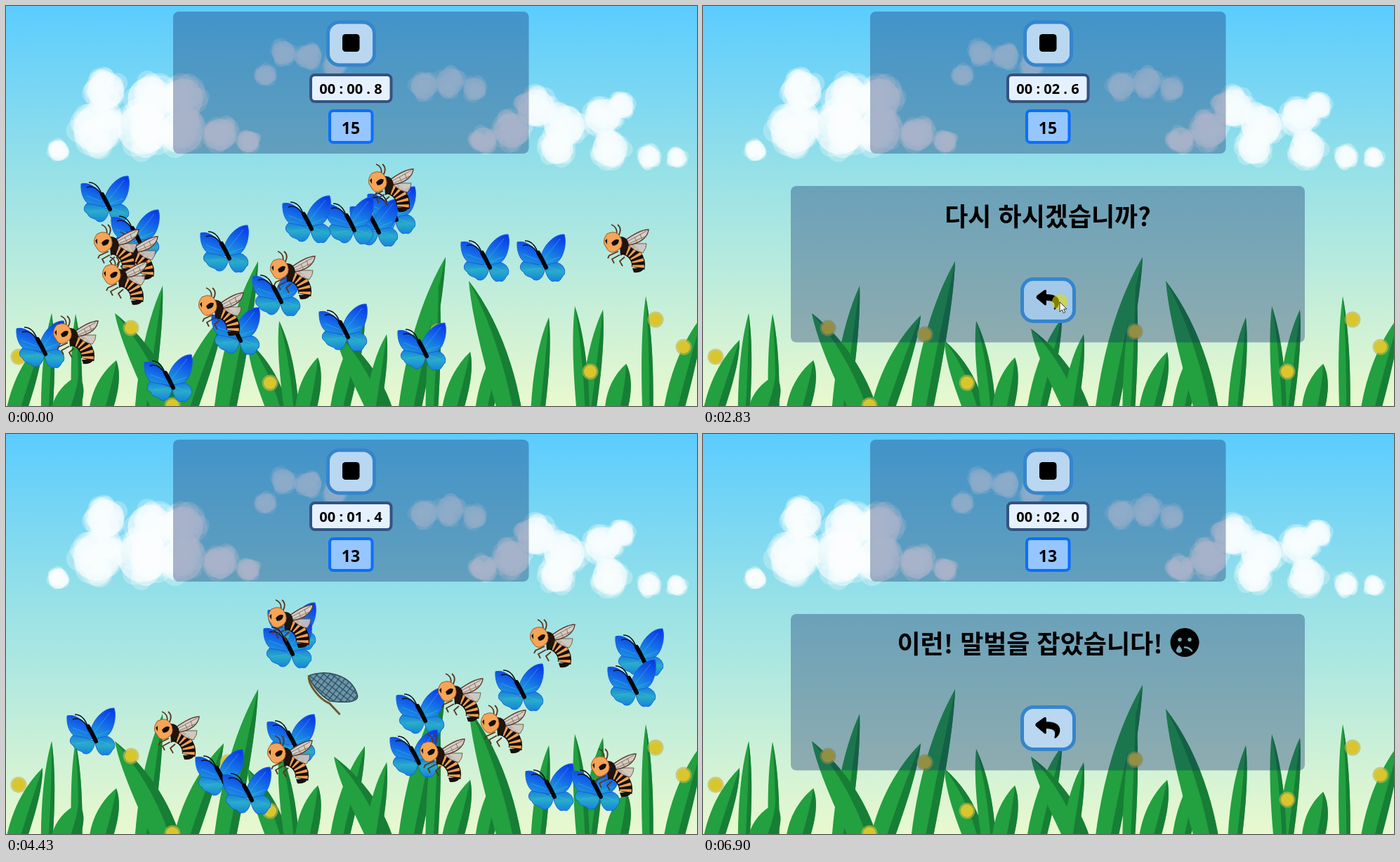
An HTML page for the animation above (6970 ms loop, 984 by 569 pixels).

```html
<!DOCTYPE html>
<html lang="ko">
<head>
<meta charset="utf-8">
<title>Butterfly net</title>
<style>
html, body { margin: 0; width: 100%; height: 100%; overflow: hidden; }
svg { display: block; width: 100vw; height: 100vh; cursor: default; }
text { text-anchor: middle; }
.digits { font-family: "Noto Sans", "Open Sans", sans-serif; font-weight: 600; }
.message { font: 600 36px "Noto Sans CJK KR", "Noto Sans CJK", sans-serif; }
.panel { fill: rgba(15, 42, 105, .35); }
.button { fill: #b9d7f0; stroke: #3585cd; stroke-width: 5; }
.button.hover { fill: #a3c8e8; }
</style>
</head>
<body>
<svg viewBox="0 0 984 569" preserveAspectRatio="none">
  <defs>
    <linearGradient id="sky" x2="0" y2="1">
      <stop offset="0" stop-color="#5bccff"/>
      <stop offset=".4" stop-color="#95e0e8"/>
      <stop offset="1" stop-color="#e9f9ce"/>
    </linearGradient>
    <linearGradient id="wing" x1=".7" y1="0" x2=".3" y2="1">
      <stop offset="0" stop-color="#0a3be6"/>
      <stop offset=".5" stop-color="#146ae8"/>
      <stop offset="1" stop-color="#1f9fd8"/>
    </linearGradient>
    <linearGradient id="lowWing" x2="0" y2="1">
      <stop offset="0" stop-color="#167be0"/>
      <stop offset=".5" stop-color="#28acc8"/>
      <stop offset="1" stop-color="#1583dc"/>
    </linearGradient>
    <pattern id="mesh" width="7" height="7" patternUnits="userSpaceOnUse" patternTransform="rotate(38)">
      <path d="M0 0H7M0 0V7" stroke="#2d4860" stroke-width="2.4"/>
    </pattern>

    <g id="butterfly">
      <g stroke="#1560dc" stroke-width="1" stroke-linejoin="round">
        <path fill="url(#lowWing)" d="M-23 3C-32 8-31 17-25 19C-23 27-14 25-11 30C-4 33 3 29 6 13Z"/>
        <path fill="url(#lowWing)" d="M5 10C6 23 13 36 20 32C28 35 28 27 33 23C36 14 29 6 18 5Z"/>
        <path fill="url(#wing)" d="M-3-5C-11-18-24-26-34-23C-35-10-30 1-24 5L3 10Z"/>
        <path fill="url(#wing)" d="M0-3C4-20 20-35 33-34C37-22 32 0 22 6L7 9Z"/>
      </g>
      <path d="M5 0L27-28M8 5L26-2M-5 2L-26-6M10 12L27 18M-1 14L-20 16" stroke="#48b6f3" opacity=".55"/>
      <path d="M-5-9Q-11-25-23-25M-6-9Q-15-22-26-18" fill="none" stroke="#071326" stroke-width="1.6"/>
      <path d="M-4-8L1 1L7 13" fill="none" stroke="#05070f" stroke-width="6" stroke-linecap="round"/>
    </g>

    <g id="bee">
      <path d="M-11 4L-24 10L-26 14M-9 9L-20 15L-17 21M-2 12L-9 18L-5 25M-14-18Q-11-30-21-34M-11-18Q-5-28-12-34" fill="none" stroke="#593620" stroke-width="1.8"/>
      <path d="M-4-1C9 1 20 15 17 28" fill="none" stroke="#120d0b" stroke-width="19"/>
      <path d="M2 1C12 4 19 16 17 28" fill="none" stroke="#f5a04f" stroke-width="17" stroke-dasharray="3.2 4"/>
      <path d="M9 28H25Q23 35 11 34Z" fill="#17100c"/>
      <path d="M1-7L29-7Q29 0 24 6Q13 5 1-7Z" fill="#cfc6bd" stroke="#6b4c40" opacity=".9"/>
      <path d="M-5-9C7-18 21-27 32-27C31-17 22-8 4-5Z" fill="#d5cec6" stroke="#5d3b30" stroke-width="1.4"/>
      <path d="M0-9L29-25M4-7L27-17M12-16L16-8M20-21L23-12" stroke="#82695d" stroke-width=".9"/>
      <path d="M-10-17Q2-18 4-5Q2 8-8 10Z" fill="#20140f"/>
      <path d="M-27-21Q-13-28-7-14Q-3-2-13 3Q-21 8-26 2L-31-6Q-33-14-27-21Z" fill="#f6a455" stroke="#9b5b28"/>
      <path d="M-21-8Q-15-15-10-12Q-11-4-19-4ZM-30-11L-27-14L-27-6Z" fill="#130d0b"/>
    </g>

    <path id="pointerShape" d="M0 0V14L3.3 11L5.5 15.7L7.7 14.7L5.6 10H10Z" fill="#fff" stroke="#222" stroke-width=".9"/>
    <g id="netShape">
      <path id="bag" d="M-35-25C-12-35 27-28 35 3C36 14 14 13-4 11Q-25-2-35-25Z" fill="rgba(35,75,115,.3)"/>
      <use href="#bag" style="fill: url(#mesh)"/>
      <path d="M-35-25C-12-35 27-28 35 3C36 14 14 13-4 11Q-25-2-35-25Z" fill="url(#mesh)" stroke="#36495a" stroke-width="1.5"/>
      <path d="M-34-26C-37-13-18 9-5 14L10 30" fill="none" stroke="#71572e" stroke-width="3"/>
    </g>
  </defs>

  <rect width="984" height="569" fill="url(#sky)"/>
  <g id="clouds" fill="#fff"></g>
  <g id="grass"></g>

  <rect class="panel" x="238" y="8" width="506.5" height="202" rx="8"/>
  <rect id="stop" class="button" x="458.5" y="23" width="66" height="61" rx="16"/>
  <rect x="479" y="40" width="24.5" height="25" rx="4.5"/>
  <rect x="434" y="98" width="114.5" height="38" rx="6" fill="#e6f1ff" stroke="#335380" stroke-width="4"/>
  <text id="clock" class="digits" x="491" y="124.5" font-size="20"></text>
  <rect x="461" y="149" width="60.5" height="45" rx="5" fill="#96c6ff" stroke="#0d6efd" stroke-width="4"/>
  <text id="score" class="digits" x="491" y="181.5" font-size="23"></text>

  <g id="meadow"></g>

  <g id="dialog">
    <rect class="panel" x="125" y="256" width="732" height="222.5" rx="8"/>
    <text id="retry" class="message" x="491" y="313">다시 하시겠습니까?</text>
    <g id="caughtBee">
      <text class="message" x="465.5" y="312">이런! 말벌을 잡았습니다!</text>
      <g transform="translate(686 296.5)" fill="#79a6b7">
        <circle r="20.5" fill="#000"/>
        <circle cx="-7" cy="-4" r="2.7"/><circle cx="7" cy="-4" r="2.7"/>
        <path d="M-8 4Q-13 10-12 13Q-8 17-4 13Q-3 10-8 4Z"/>
        <path d="M0 7Q6 7 10 12" fill="none" stroke="#79a6b7" stroke-width="2.6" stroke-linecap="round"/>
      </g>
    </g>
    <rect id="back" class="button" x="454.5" y="388.5" width="74" height="60" rx="16"/>
    <path id="arrow" d="M-15.5-6L-5-13.5Q-2-15-2-12V-8C10-8 16-4 16 3C16 8 13 12 10 13.5Q8 14 9 11C11 4 7 1-2 1V6Q-2 9-5 7L-15.5-2Q-17-4-15.5-6Z"/>
  </g>

  <circle id="click" r="11" fill="#e6dc00" opacity=".58"/>
  <use id="pointer" href="#pointerShape"/>
  <use id="net" href="#netShape"/>
</svg>

<script>
const LOOP = 6970;
const A_END = 1900, B_START = 3015, B_END = 5110;
const $ = id => document.getElementById(id);

function add(parent, tag, attrs) {
  const el = document.createElementNS("http://www.w3.org/2000/svg", tag);
  for (const name in attrs) el.setAttribute(name, attrs[name]);
  return parent.appendChild(el);
}

let seed = 7;
const random = () => (seed = seed * 16807 % 2147483647) / 2147483647;
const ease = k => k * k * (3 - 2 * k);

// Each lobe [x, y, radius] becomes a cluster of translucent puffs.
function cloud(opacity, lobes) {
  const group = add($("clouds"), "g", { opacity });
  for (const [x, y, size] of lobes) {
    add(group, "circle", { cx: x, cy: y, r: size * .75, opacity: .6 });
    for (let i = 0; i < 26; i++) {
      const r = size * (.3 + .2 * random()), angle = 2 * Math.PI * random();
      const reach = (size - r) * Math.sqrt(random());
      add(group, "circle", { cx: x + reach * Math.cos(angle), cy: y + reach * Math.sin(angle), r, opacity: .28 });
    }
  }
}

cloud(.97, [[142, 120, 35], [205, 132, 42], [252, 132, 38], [130, 175, 45], [195, 175, 48],
  [250, 180, 40], [75, 206, 19], [305, 183, 30], [345, 193, 20]]);
cloud(.95, [[755, 145, 35], [795, 170, 38], [850, 157, 33], [876, 142, 23], [720, 177, 33],
  [680, 190, 23], [785, 202, 30], [860, 203, 33], [915, 214, 20], [955, 216, 18]]);
cloud(.68, [[395, 66, 22], [432, 72, 23], [370, 98, 18], [468, 84, 20]]);
cloud(.68, [[595, 114, 24], [632, 108, 26], [667, 118, 21]]);

// Leaning and short blades are broader; all of them arch towards the tip.
function blade(base, tipX, tipY) {
  const lean = tipX - base, height = 580 - tipY;
  const half = (14 + .35 * Math.abs(lean) + .3 * Math.max(0, tipY - 470)) / 2;
  const at = (k, side) => `${base + lean * (k - .25 * k * (1 - k) * 2) + side * half} ${580 - height * k}`;
  const edge = side => `C${at(.4, 1.25 * side)} ${at(.75, .95 * side)} ${tipX} ${tipY}`;
  const back = side => `C${at(.75, .95 * side)} ${at(.4, 1.25 * side)} ${at(0, side)}Z`;
  add($("grass"), "path", { fill: "#23a03f", d: `M${at(0, -1)}${edge(-1)}${back(1)}` });
  add($("grass"), "path", { fill: "#147632", opacity: .8, d: `M${at(0, .3)}${edge(.35)}${back(1)}` });
}

[[195, 223, 398], [474, 511, 444], [680, 706, 476], [829, 850, 432], [14, 52, 475], [58, 65, 437],
  [101, 99, 438], [83, 103, 525], [134, 157, 504], [230, 155, 437], [254, 310, 440], [311, 359, 363],
  [388, 344, 476], [407, 389, 448], [426, 444, 500], [534, 467, 459], [522, 542, 467], [574, 626, 357],
  [606, 616, 392], [635, 661, 492], [718, 659, 391], [757, 773, 443], [822, 810, 427], [868, 883, 509],
  [914, 911, 413], [950, 992, 440]].forEach(b => blade(...b));

for (const [cx, cy] of [[18, 499], [178, 458], [316, 467], [376, 536], [237, 568], [615, 463],
  [832, 520], [925, 446], [965, 485]]) {
  add($("grass"), "circle", { cx, cy, r: 11.5, fill: "#c4b44c", opacity: .65 });
  add($("grass"), "circle", { cx, cy, r: 9, fill: "#d9c62c" });
}

// A third value is the moment at which the insect is caught.
function swarm(butterflies, bees) {
  const group = add($("meadow"), "g", {});
  const place = href => ([x, y, caught = Infinity]) => ({ x, y, caught, el: add(group, "use", { href }) });
  return { group, insects: [...butterflies.map(place("#butterfly")), ...bees.map(place("#bee"))] };
}

const first = swarm(
  [[141, 276], [184, 324], [311, 346], [549, 291], [524, 309], [489, 306], [428, 304], [385, 408],
    [327, 463], [49, 482], [231, 530], [480, 458], [592, 485], [682, 359], [762, 359]],
  [[548, 259], [883, 345], [408, 383], [306, 435], [184, 355], [157, 345], [169, 391], [99, 475]]);
const second = swarm(
  [[121, 424], [304, 483], [343, 508], [289, 370, 3550], [326, 316, 3900], [407, 274], [401, 300], [406, 433],
    [590, 395], [581, 455], [731, 361], [774, 503], [840, 503], [902, 311], [891, 355]],
  [[243, 429], [405, 270], [404, 463], [647, 375], [621, 461], [708, 420], [778, 298], [865, 482]]);

// Stops of the mouse: [time, x, y].
const stops = [[70, 888, 517], [830, 570, 361], [1160, 462, 290], [1620, 497, 72], [1950, 497, 72],
  [2600, 508, 421], [3030, 508, 421], [3500, 289, 360], [3800, 320, 344], [3950, 320, 344], [4250, 511, 430],
  [4650, 405, 288], [5320, 405, 288], [5650, 535, 403], [5980, 570, 440], [6700, 1000, 590]];
const clicks = [1700, 2740, 3490, 3850, 4900];

function mouseAt(t) {
  const i = Math.max(1, stops.findIndex(s => s[0] > t));
  if (t >= stops[stops.length - 1][0]) return stops[stops.length - 1].slice(1);
  const [from, x0, y0] = stops[i - 1], [to, x1, y1] = stops[i];
  const k = ease(Math.max(0, (t - from) / (to - from)));
  return [x0 + (x1 - x0) * k, y0 + (y1 - y0) * k];
}

const show = (el, on) => el.setAttribute("display", on ? "inline" : "none");

function beat(ms) {
  const p = Math.max(0, ms) / 1000 % 1;
  return 1 + .25 * (p < .45 ? ease(p / .45) : p < .9 ? ease((.9 - p) / .45) : 0);
}

function drawSwarm({ group, insects }, active, t, mx, my) {
  show(group, active);
  if (!active) return;
  const near = b => t < b.caught && Math.abs(b.x - mx) < 34 && Math.abs(b.y - my) < 34;
  const hovered = [...insects].reverse().find(near);
  for (const b of insects) {
    show(b.el, t < b.caught);
    b.el.setAttribute("transform", `translate(${b.x} ${b.y}) scale(${b === hovered ? 1.1 : 1})`);
  }
}

function render(t) {
  const inA = t < A_END, inB = t >= B_START && t < B_END;
  const [x, y] = mouseAt(t);
  const present = t >= 70;
  const [mx, my] = present ? [x, y] : [-99, -99];
  drawSwarm(first, inA, t, mx, my);
  drawSwarm(second, inB, t, mx, my);

  const elapsed = t < B_START ? Math.min(2600, t + 830) : Math.max(0, Math.min(2000, t - 3020));
  const tenths = Math.floor(elapsed / 100);
  $("clock").textContent = `00 : 0${Math.floor(tenths / 10)} . ${tenths % 10}`;
  $("score").textContent = 15 - second.insects.filter(b => t >= b.caught).length;

  show($("dialog"), !inA && !inB);
  show($("retry"), t < B_START);
  show($("caughtBee"), t >= B_END);
  $("arrow").setAttribute("transform", `translate(491 418) scale(${beat(t - (t < B_START ? 1990 : 5180))})`);

  const over = (left, top, right, bottom) => mx > left && mx < right && my > top && my < bottom;
  $("stop").classList.toggle("hover", over(456, 20, 527, 86));
  $("back").classList.toggle("hover", over(452, 386, 531, 451));

  const holdsNet = (inA || inB) && y > 210 || t >= B_END && t < 5320;
  show($("net"), present && holdsNet);
  show($("pointer"), present && !holdsNet);
  show($("click"), clicks.some(c => t >= c && t < c + 200));
  for (const id of ["net", "pointer", "click"]) $(id).setAttribute("transform", `translate(${x} ${y})`);
}

const start = performance.now();
function frame() {
  render((performance.now() - start) % LOOP);
  requestAnimationFrame(frame);
}
frame();
</script>
</body>
</html>
```
